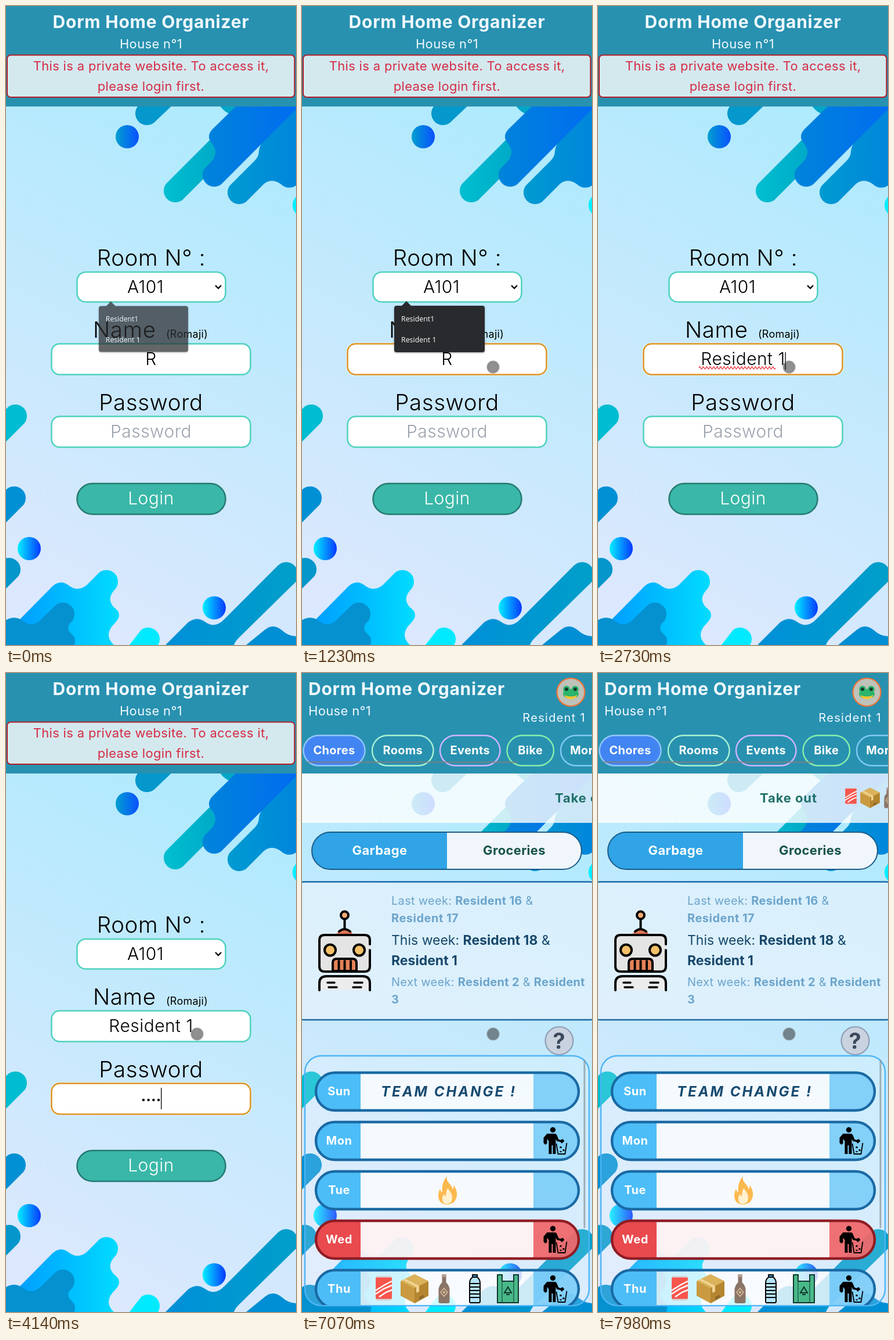
An HTML page for the animation above (8000 ms loop, 500 px wide and 1100 px high).

```html
<!DOCTYPE html>
<html lang="en">
<head>
<meta charset="utf-8">
<title>Dorm Home Organizer</title>
<style>
  html, body { margin: 0; width: 100%; height: 100%; overflow: hidden; }
  svg { display: block; width: 100vw; height: 100vh; font-family: Inter, "Open Sans", sans-serif; }
  text { letter-spacing: .015em; white-space: pre; }
  .mid { text-anchor: middle; }
  .bold, .bold text, tspan.b { font-weight: 700; }
  .bold { letter-spacing: .025em; }
  .label { font-size: 38.5px; font-weight: 350; }
  .field { font-size: 30px; font-weight: 350; }
  .box { fill: #fff; stroke: #4dd2bd; stroke-width: 2.5; }
  .box.focus { stroke: #e09322; filter: drop-shadow(0 0 1.5px #fff); }
  .caret { stroke: #111; stroke-width: 1.4; }
  .tip { font: 12.4px "Open Sans", "Noto Sans", sans-serif; fill: #fff; }
  .tip text { letter-spacing: 0; }
  .faint { font-size: 20px; fill: #6ba4cb; }
  .now { font-size: 23px; fill: #17476b; letter-spacing: 0; }
  .ink { fill: none; stroke: #000; stroke-width: 4; stroke-linecap: round; stroke-linejoin: round; }
</style>
</head>
<body>
<svg viewBox="0 0 500 1100" preserveAspectRatio="none">
  <defs>
    <linearGradient id="sky" gradientUnits="userSpaceOnUse" x1="50" y1="1000" x2="450" y2="250">
      <stop stop-color="#dbe8fd"/><stop offset="1" stop-color="#b0eafd"/>
    </linearGradient>
    <linearGradient id="ball"><stop stop-color="#00f0ff"/><stop offset="1" stop-color="#0838ff"/></linearGradient>
    <linearGradient id="ballTop"><stop stop-color="#009fcf"/><stop offset="1" stop-color="#0a50ff"/></linearGradient>
    <linearGradient id="deep"><stop stop-color="#0084da"/><stop offset="1" stop-color="#006cf0"/></linearGradient>
    <linearGradient id="teal"><stop stop-color="#00bfd0"/><stop offset="1" stop-color="#00a3c4"/></linearGradient>
    <linearGradient id="mild"><stop stop-color="#008fd8"/><stop offset="1" stop-color="#009fc9"/></linearGradient>
    <linearGradient id="mildBack"><stop stop-color="#009bd0"/><stop offset="1" stop-color="#0086dc"/></linearGradient>
    <linearGradient id="bright"><stop stop-color="#0096ff"/><stop offset="1" stop-color="#00dcff"/></linearGradient>
    <clipPath id="pill"><rect x="24" y="2" width="453" height="65" rx="32"/></clipPath>
    <clipPath id="listClip"><rect x="6" y="660" width="488" height="428" rx="27"/></clipPath>
    <clipPath id="toggleClip"><rect x="17" y="274" width="465" height="64" rx="32"/></clipPath>

    <g id="can">
      <path d="M-14-17l2-4H12l2 4V17l-2 4H-12l-2-4z" fill="#f8564d"/>
      <path d="M-13-20H13M-13 20H13" stroke="#d5d8dc" stroke-width="3"/>
      <path d="M-14 4L2-6 14-12M-14 10L0 1 14-5M-8 15L4 7 14 3" stroke="#fff" stroke-width="2.5" fill="none"/>
    </g>
    <g id="carton">
      <path d="M0-25L24-13V12L0 25-24 12V-13z" fill="#c99a3f"/>
      <path d="M0-1L24-13V12L0 25z" fill="#b58530"/>
      <path d="M0-25L24-13 0-1-24-13z" fill="#dbb25a"/>
      <path d="M-15-17L8-5V5l-5 2V-3L-20-15z" fill="#f0d391"/>
      <path d="M8 14l8-4v5l-8 4z" fill="#8d6726"/>
    </g>
    <g id="bottle">
      <path d="M-3.5-25h7v14q6 6 6 13v20q0 3-3 3h-13q-3 0-3-3V2q0-7 6-13z" fill="#8a7468"/>
      <path d="M-4-25h8v5h-8z" fill="#b3a197"/>
      <path d="M0-1l6 7-6 7-6-7z" fill="none" stroke="#d8bf96" stroke-width="1.5"/>
      <circle cy="6" r="2" fill="#d8bf96"/>
    </g>
    <g id="water" stroke="#000" stroke-width="2">
      <path d="M-4-20h8q5 4 5 10v32q0 2-2 2H-7q-2 0-2-2v-32q0-6 5-10z" fill="#b5e4fb"/>
      <path d="M-4-24h8v4h-8z" fill="#4da8e8"/>
      <path d="M-9-9H9M-9-3H9M-9 3H9M-9 9H9M-9 15H9"/>
    </g>
    <g id="bag" stroke="#12352b" stroke-width="2">
      <path d="M-18-24h8v11h20v-11h8v48h-36z" fill="#48b98a"/>
      <path d="M-10-13v37M10-13v37" stroke-width="1"/>
      <path d="M0-3l6 10h-12zM-3 10h6" fill="none"/>
    </g>
    <g id="tosser">
      <circle cx="16" cy="4.5" r="4.7"/>
      <path d="M6 11h13q3 0 4 3l3 7 8 2-1 3-10-2-2-4v26h-5V31h-2v15H9V24l-3-4v8l-3 2-3-3V18z"/>
      <path d="M22 28l3 18h12l3-19" fill="none" stroke="#000" stroke-width="1.8"/>
      <path d="M28 23l5-3 3 4-5 4zM28 33h3v3h-3zM33 38h3v3h-3zM28 41h3v2h-3z"/>
    </g>
  </defs>

  <rect width="500" height="1100" fill="url(#sky)"/>
  <g id="scenery">
    <path d="M227 173L300 100 330 130 255 201A20 20 0 0 1 227 173z" fill="#0498cc"/>
    <circle cx="209" cy="225" r="20" fill="url(#ballTop)"/>
    <path d="M276 306L355 227 390 248 304 334A20 20 0 0 1 276 306z" fill="url(#teal)"/>
    <path d="M366 165q6 17 24 22l30-22z" fill="#00a6c8"/>
    <path d="M386 309L429 266Q436 259 436 250 437 238 450 225L500 160V309Q486 318 473 306 458 296 445 306L414 337A20 20 0 0 1 386 309z" fill="url(#mildBack)"/>
    <path d="M397 172L356 212Q345 224 354 235 367 250 356 266L343 279A20 20 0 0 0 371 307L500 178V165H404z" fill="url(#deep)"/>
    <circle cx="514" cy="343" r="20" fill="#00eeff"/>
    <path d="M-20 714L4 690A20 20 0 0 1 32 718L-20 770z" fill="#00bcd0"/>
    <path d="M-20 854L2 831A20 20 0 0 1 30 859L-20 909z" fill="#0290d4"/>
    <path d="M-20 968L-7 954A20 20 0 0 1 21 982L-20 1023z" fill="#0596cc"/>
    <circle cx="40" cy="934" r="20" fill="url(#ball)"/>
    <path d="M0 1080L80 999Q94 986 109 998 124 1009 139 997L161 975A20 20 0 0 1 189 1003Q172 1020 186 1035 203 1047 188 1062 167 1082 186 1100H0z" fill="url(#bright)"/>
    <path d="M0 1057Q16 1048 30 1059 44 1070 58 1058L86 1031A20 20 0 0 1 114 1059Q101 1070 113 1081 122 1088 118 1100H0z" fill="#0591d0"/>
    <path d="M205 1110L233 1074A20 20 0 0 1 261 1102L250 1112z" fill="#00eaff"/>
    <circle cx="359" cy="1036" r="20" fill="url(#ball)"/>
    <path d="M275 1100L314 1061Q329 1050 343 1060 360 1073 377 1055L469 963A20 20 0 0 1 503 977V988L401 1088Q395 1094 393 1100z" fill="url(#mild)"/>
    <path d="M414 1100L446 1074Q460 1062 475 1074 487 1085 500 1085V1100z" fill="#008fd4"/>
  </g>
  <rect width="500" height="173" fill="#2891b0"/>

  <g id="login">
    <g fill="#f0f9ff" class="mid">
      <text class="bold" x="250" y="38" font-size="30">Dorm Home Organizer</text>
      <text x="250" y="73" font-size="22">House n°1</text>
    </g>
    <rect x="2" y="84.5" width="495.5" height="72.5" rx="6" fill="#d4e9ee" stroke="#b51d28" stroke-width="2"/>
    <g class="mid" font-size="22" fill="#d62c45">
      <text x="250" y="111">This is a private website. To access it,</text>
      <text x="250" y="146">please login first.</text>
    </g>
    <text class="label mid" x="250.500" y="447">Room N° :</text>
    <rect class="box" x="122.500" y="458" width="256" height="51.500" rx="15"/>
    <text class="field mid" x="240.500" y="494">A101</text>
    <path d="M361 481l5 5 5-5" fill="none" stroke="#000" stroke-width="2.4"/>
    <text class="label" x="150" y="571">Name</text>
    <text x="276" y="571" font-size="18">(Romaji)</text>
    <rect id="nameBox" class="box" x="78.500" y="581.500" width="343" height="53" rx="14"/>
    <text id="name" class="field mid" x="250" y="618"></text>
    <path id="wave" fill="none" stroke="#e8303a" stroke-width="1.300"/>
    <path id="nameCaret" class="caret" d="M0 596V626"/>
    <text class="label mid" x="250" y="696">Password</text>
    <rect id="passBox" class="box" x="78.500" y="706.500" width="343" height="53" rx="14"/>
    <text id="hint" class="field mid" x="250" y="743" fill="#9ca3af">Password</text>
    <path id="dots" stroke="#000" stroke-width="4.400" stroke-linecap="round"/>
    <path id="passCaret" class="caret" d="M0 714V751"/>
    <g id="button">
      <rect x="122.500" y="822" width="256" height="53" rx="26.500" fill="#3ab7a8" stroke="#237a70" stroke-width="2.500"/>
      <text class="field mid" x="250" y="858" fill="#fff">Login</text>
    </g>
    <g id="buttonOff">
      <rect x="121" y="821" width="259" height="55" rx="27" fill="#b0cbdf"/>
      <text class="field mid" x="250" y="858" fill="#d6e9f9">Login</text>
    </g>
    <g id="popup" class="tip">
      <path d="M171 517l9-9 9 9z" fill="#292a2d"/>
      <rect id="popupBox" x="159" y="516" width="156" height="80" rx="4" fill="#292a2d" style="filter:drop-shadow(0 1px 1.500px #0006)"/>
      <text id="tipA" x="171" y="543">Resident1</text>
      <text id="tipB" x="171" y="579">Resident 1</text>
    </g>
  </g>

  <g id="home">
    <g fill="#f0f9ff">
      <text class="bold" x="11" y="38" font-size="30">Dorm Home Organizer</text>
      <text x="11" y="73" font-size="22">House n°1</text>
      <text x="489" y="84" font-size="20" text-anchor="end" style="letter-spacing:1.300px">Resident 1</text>
    </g>
    <circle cx="463.500" cy="33" r="24" fill="#bfc2b9" stroke="#f07434" stroke-width="2.200"/>
    <g fill="#2cb56c">
      <circle cx="456" cy="28" r="6"/><circle cx="471" cy="28" r="6"/><ellipse cx="463.500" cy="36" rx="13.500" ry="8.500"/>
      <path d="M452 38q11.500 5 23 0-3 7-11.500 7T452 38z" fill="#f7c531"/>
      <g fill="#17382a"><circle cx="456" cy="28" r="3"/><circle cx="471" cy="28" r="3"/></g>
    </g>
    <g id="tabs" class="bold mid" font-size="20" fill="#fff" stroke-width="2.400"></g>
    <path d="M10 153.500H370" stroke="#808080" stroke-opacity=".65" stroke-width="3" stroke-linecap="round"/>

    <rect y="173" width="500" height="85" fill="#fff" fill-opacity=".8"/>
    <g id="marquee">
      <text class="bold" y="223" font-size="22" fill="#1f7069" style="letter-spacing:.9px">Take out</text>
      <g id="haul"></g>
    </g>

    <g clip-path="url(#toggleClip)">
      <path d="M17 274h233v64H17z" fill="#30a4e6"/><path d="M250 274h233v64H250z" fill="#f0f6fb"/>
    </g>
    <rect x="17" y="274" width="465" height="64" rx="32" fill="none" stroke="#1b5a88" stroke-width="2"/>
    <g class="bold mid" font-size="22">
      <text x="134" y="313" fill="#fff">Garbage</text><text x="366" y="313" fill="#14524a">Groceries</text>
    </g>

    <rect x="-6" y="359.500" width="512" height="237.500" rx="9" fill="#ecf5fc" fill-opacity=".65" stroke="#1a68a4" stroke-width="2.500"/>
    <text class="faint" x="154" y="399">Last week: <tspan class="b">Resident 16</tspan> &amp;</text>
    <text class="faint bold" x="154" y="429">Resident 17</text>
    <text class="now" x="154" y="468">This week: <tspan class="b">Resident 18</tspan> &amp;</text>
    <text class="now bold" x="154" y="503">Resident 1</text>
    <text class="faint" x="154" y="539">Next week: <tspan class="b">Resident 2</tspan> &amp; <tspan class="b">Resident</tspan></text>
    <text class="faint bold" x="154" y="569">3</text>

    <g class="ink">
      <path d="M60 451a13.500 11 0 0 1 27 0z" fill="#e27452" stroke="none"/>
      <path d="M73.500 424V441M64 445q9-8 19 0"/>
      <circle cx="73.500" cy="417" r="6.500" fill="#f5aa72"/>
      <rect x="30" y="451" width="87" height="63" rx="9" fill="#e4e4e4" stroke="none"/>
      <path d="M117 467V460q0-9-9-9H39q-9 0-9 9v45q0 9 9 9h69q9 0 9-9v-28"/>
      <circle cx="48.500" cy="477" r="9.500" fill="#f4c067"/><circle cx="98.500" cy="477" r="9.500" fill="#f4c067"/>
      <path d="M53 513V499q0-7 7-7H87q7 0 7 7v14z" fill="#e58258"/>
      <path d="M63.500 496v14M73.500 496v14M84 496v14"/>
      <path d="M30 546V534q0-12 12-12h63q12 0 12 12v12" fill="#ececec"/>
      <path d="M44 522h44M44 533h12M60 541h-14M90 533h14M88 541h14" stroke-width="3.500"/>
    </g>

    <circle cx="443.500" cy="633" r="24" fill="#c9d3df" stroke="#8f9db6" stroke-width="2.200"/>
    <text class="bold mid" x="443.500" y="647" font-size="38" fill="#3b485d">?</text>

    <rect x="5" y="659" width="490" height="430" rx="28" fill="#fff" fill-opacity=".16" stroke="#4db5f5" stroke-width="2.400"/>
    <g id="rows" clip-path="url(#listClip)"></g>
    <path d="M487 667V954" stroke="#8e979e" stroke-opacity=".75" stroke-width="3" stroke-linecap="round"/>
    <text class="bold mid" x="253" y="729" font-size="24" font-style="italic" fill="#164a70" style="letter-spacing:3px">TEAM CHANGE !</text>
    <path d="M250 866q-2 7 5 14 4 4 5 9 2-3 1-8 7 9 6 19-2 14-17 15-15-1-15-16 0-6 3-11 1 5 4 6-2-16 8-28z" fill="#fdb84e"/>
    <path d="M251 887q7 7 8 15 0 12-9 12-8 0-8-9 0-5 3-8 1 3 3 4 0-8 3-14z" fill="#fff0cf"/>
  </g>

  <circle id="touch" r="10" fill="#1c1c1c" fill-opacity=".49" stroke="#707070" stroke-opacity=".5" stroke-width="2.500"/>
</svg>
<script>
  const $ = id => document.getElementById(id);
  const LOOP = 8000;
  const word = 'Resident 1';
  const nameKeys = [1580, 1810, 1910, 2010, 2110, 2210, 2310, 2430, 2610];
  const passKeys = [3670, 3820, 4000, 4140, 4580, 4720, 4960, 5120, 5270, 5350, 5500, 5560];
  const touchPath = [[30, 423, 955], [330, 352, 620], [430, 335, 508], [550, 371, 551], [700, 329.5, 621.5]];
  const PITCH = 8.7;

  // Static repeats
  $('tabs').innerHTML = [
    ['Chores', 2.5, 106, '#92c8fc', '#4285f2'], ['Rooms', 121, 105.5, '#a9f2d2'],
    ['Events', 238, 103.5, '#d0b6fd'], ['Bike', 353.5, 80.5, '#88eeac'], ['More', 446, 84, '#7fcaf8']
  ].map(([label, x, w, line, fill = 'none']) =>
    `<rect x="${x}" y="107.5" width="${w}" height="52" rx="26" fill="${fill}" stroke="${line}"/>
     <text x="${x + w / 2}" y="140">${label}</text>`).join('');

  const items = ['can', 'carton', 'bottle', 'water', 'bag'];
  const use = (id, x, y, s = 1) => `<use href="#${id}" transform="translate(${x} ${y}) scale(${s})"/>`;
  $('haul').innerHTML = items.map((id, i) => use(id, [157, 190, 221, 250, 285][i], i ? 215 : 212, .7)).join('');

  const row = (day, i) => {
    const red = day === 'Wed';
    const [line, left, right] = red ? ['#8f1d24', '#e84a4d', '#f0696c'] : ['#1a6aa4', '#4dbdf7', '#7fcff9'];
    const person = day === 'Sun' || day === 'Tue' ? '' : use('tosser', 416.5, 11);
    return `<g transform="translate(0 ${686 + 85 * i})">
      <g clip-path="url(#pill)">
        <path d="M22 0h79v69h-79z" fill="${left}"/>
        <path d="M101 0h298v69h-298z" fill="${red ? '#fff3f3' : '#fff'}" fill-opacity="${red ? .93 : .76}"/>
        <path d="M399 0h80v69h-80z" fill="${right}" fill-opacity=".94"/>
      </g>
      <rect x="24" y="2" width="453" height="65" rx="32.5" fill="none" stroke="${line}" stroke-width="4.4"/>
      <text class="bold mid" x="64" y="41" font-size="20" fill="#fff">${day}</text>${person}</g>`;
  };
  $('rows').innerHTML = ['Sun', 'Mon', 'Tue', 'Wed', 'Thu'].map(row).join('') +
    items.map((id, i) => use(id, [141, 194, 245, 298, 355][i], i ? 1060 : 1059)).join('');

  $('wave').setAttribute('d', 'M174 623q1.5-4 3 0' + 't3 0'.repeat(43));

  // Helpers
  const show = (id, on) => $(id).style.display = on ? '' : 'none';
  const ramp = (t, a, b) => Math.min(1, Math.max(0, (t - a) / (b - a)));
  const pressed = (keys, t) => keys.filter(k => t >= k).length;
  const within = (t, ...spans) => spans.some(([a, b]) => t >= a && t < b);
  const moveX = (id, x) => $(id).setAttribute('transform', `translate(${x} 0)`);

  function touchAt(t) {
    const i = touchPath.findIndex(p => p[0] > t);
    if (i < 0) return touchPath[touchPath.length - 1].slice(1);
    const [t0, x0, y0] = touchPath[Math.max(0, i - 1)], [t1, x1, y1] = touchPath[i];
    const k = ramp(t, t0, t1), e = k * k * (3 - 2 * k);
    return [x0 + (x1 - x0) * e, y0 + (y1 - y0) * e];
  }

  function popupAlpha(t) {
    if (t < 730) return .72 * (1 - ramp(t, 10, 130));
    return t < 2610 ? ramp(t, 730, 840) : 1 - ramp(t, 2610, 2730);
  }

  function drawLogin(t) {
    const text = word.slice(0, 1 + pressed(nameKeys, t));
    if ($('name').textContent !== text) $('name').textContent = text;
    $('nameBox').classList.toggle('focus', within(t, [730, 2960]));
    show('nameCaret', within(t, [730, 1230], [1580, 2960]));
    moveX('nameCaret', 250.5 + $('name').getComputedTextLength() / 2);
    show('wave', within(t, [2430, 2960]));

    const n = pressed(passKeys, t);
    show('hint', !n);
    $('passBox').classList.toggle('focus', t >= 2960);
    $('dots').setAttribute('d', Array.from({ length: n }, (_, i) =>
      `M${250 + (i - (n - 1) / 2) * PITCH} 735h.01`).join(''));
    show('passCaret', within(t, [2960, 3440], [3670, 5970], [6420, LOOP]));
    moveX('passCaret', 250.3 + n * PITCH / 2);

    const off = t < 5970 ? 0 : t < 6020 ? .5 : 1;
    $('button').style.opacity = 1 - off;
    $('buttonOff').style.opacity = off;

    const a = popupAlpha(t), s = .953 + .047 * a, single = t >= 2430;
    $('popup').style.opacity = a;
    $('popup').setAttribute('transform', `translate(237 552) scale(${s}) translate(-237 -552)`);
    $('popupBox').setAttribute('height', single ? 44 : 80);
    show('tipA', !single);
    $('tipB').setAttribute('y', single ? 543 : 579);
  }

  function draw(now) {
    const t = now % LOOP, inside = t >= 6670;
    show('login', !inside);
    show('home', inside);
    if (inside) moveX('marquee', 436 - (t - 7070) * .1725);
    else drawLogin(t);
    const [x, y] = touchAt(t);
    show('touch', t >= 30);
    $('touch').setAttribute('transform', `translate(${x} ${y})`);
    $('touch').style.opacity = within(t, [730, 1060]) ? .85 : 1;
  }

  let start;
  function tick(now) {
    start ??= now;
    draw(now - start);
    requestAnimationFrame(tick);
  }
  draw(0);
  requestAnimationFrame(tick);
</script>
</body>
</html>
```
